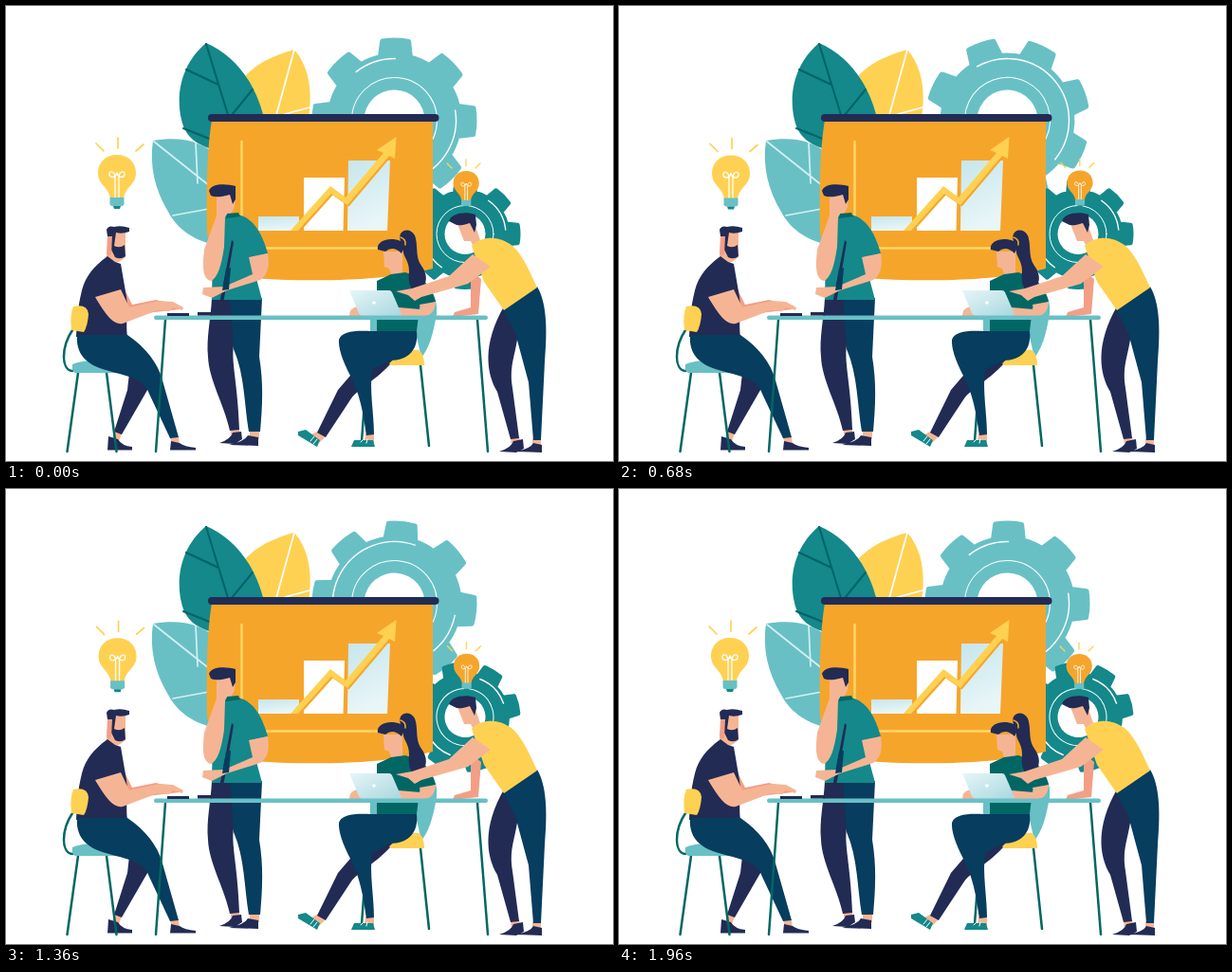
These frames come from a looping animation (640 px wide and 480 px high, 2 s). An HTML page:

```html
<!DOCTYPE html>
<html lang="en">
<head>
<meta charset="utf-8">
<title>Team meeting</title>
<style>
html, body { margin: 0; width: 100%; height: 100%; overflow: hidden; background: #fff; }
svg { display: block; width: 640px; height: 480px; }
.navy { fill: #222b54; } .blue { fill: #073d5e; } .teal { fill: #14888a; } .deep { fill: #006764; }
.aqua { fill: #68c0c5; } .sun { fill: #ffd152; } .amber { fill: #f6a52b; }
.skin { fill: #f5b595; } .blush { fill: #f29f86; }
.line { fill: none; stroke-linecap: round; stroke-linejoin: round; }
.leg { stroke: #006764; stroke-width: 2.5; }
.white { stroke: #fff; }
</style>
</head>
<body>
<svg viewBox="0 0 640 480">
<defs>
  <linearGradient id="ice" x2=".3" y2="1"><stop stop-color="#c6e6ec"/><stop offset="1" stop-color="#e9f6f8"/></linearGradient>
  <linearGradient id="lid" x2="1" y2="1"><stop stop-color="#e6f6f8"/><stop offset="1" stop-color="#a9d7df"/></linearGradient>
  <path id="arrow" d="M300 237L342 190L358 202L398 155L391 152L411.500 138L410 161L404 158L360 210L343 198L308 237Z"/>
  <!-- bulb drawn around the middle of its glass -->
  <g id="bulb">
    <path d="M0-19C12-19 20-11 20 0C20 13 9 14 7 27H-7C-9 14-20 13-20 0C-20-11-12-19 0-19Z"/>
    <path class="line white" stroke-width="1.300" d="M-2 26V4C-3-3-9-2-8 2C-7 6-1 5 0 0C1 5 7 6 8 2C9-2 3-3 2 4V26"/>
    <path class="aqua" d="M-7.500 26H7.500V33Q7 35 5 35H-5Q-7 35-7.500 33Z"/>
    <path class="teal" d="M-4 35H4L3 38H-3Z"/>
  </g>
</defs>

<!-- foliage -->
<path class="sun" d="M304 46C278 53 262 63 252 74L271 118H319C322 98 323 68 304 46Z"/>
<path class="line white" stroke-width="1.700" d="M304 46L285 115M294 114L320 107"/>
<path class="aqua" d="M155 142C185 137 205 143 220 156V252C195 246 180 234 171 217C157 194 151 168 155 142Z"/>
<path class="line" stroke="#d5f0f2" stroke-width="1.700" d="M156 143L215 190M200 144L202 187M176 221L214 214"/>
<path class="teal" d="M211 39C240 52 262 78 272 118L217 151C201 146 189 138 185 120C178 90 187 59 211 39Z"/>
<path class="line" stroke="#006468" stroke-width="2" d="M211 40L234 115M190 67L224 83M187 129L217 141M260 88L238 115"/>

<g id="big"></g>
<g id="small"></g>

<!-- presentation screen -->
<path class="amber" d="M217 120C212 150 211 190 212 240L222 284C300 292 395 292 450 277V120Z"/>
<rect class="navy" x="213" y="114" width="243.500" height="8" rx="4"/>
<path class="line" stroke="#ffd563" stroke-width="2.500" d="M248.500 143V257M274 255.500H403"/>
<path fill="url(#ice)" d="M266 222H309V237H266Z"/>
<path fill="#fff" d="M314 181H357L355.500 237H314Z"/>
<path fill="url(#ice)" d="M361 163H405L402 237H360Z"/>
<use href="#arrow" class="amber" x="1.500" y="1.500"/>
<use href="#arrow" class="sun"/>

<g id="leftBulb">
  <use href="#bulb" class="sun" x="117" y="176"/>
  <path class="line" stroke="#ffd152" stroke-width="1.700" d="M118 139V150M95 145L103 153M145 146L137 153"/>
</g>
<g id="rightBulb">
  <use href="#bulb" class="amber" transform="translate(485.200 187) scale(.68)"/>
  <path class="line" stroke="#ffd152" stroke-width="1.300" d="M485 162V169M465 166L470 171M500 166L495 171"/>
</g>

<!-- man at the left -->
<path class="skin" d="M114 448L122 451L119 459H112ZM173 455H182L183 463H175Z"/>
<path class="navy" d="M131 378L152 400L122 452L114 449L128 405Z"/>
<path class="navy" d="M108 454L118 457Q122 464 133 465V468.500H107Z"/>
<path class="line leg" d="M76 387L64.500 470M106 387L116.500 470M70 342C58 360 58 384 70 385"/>
<path class="blush" d="M122 293L133 315L158 310L185 317L183 320L130 326Z"/>
<path class="skin" d="M108 240L126 238V265L119 270L115 271L106 265Z"/>
<path class="navy" d="M107 264C92 275 84 285 80 300C75 320 75 333 74 349H128C126 335 129 320 127 307L121 272L115 270Z"/>
<path class="aqua" d="M70 378Q85 372 104 375L120 381V387H73Q69 386 70 378Z"/>
<path class="sun" d="M71 317Q86 314 87 325Q86 338 82 344L69 342Q67 326 71 317Z"/>
<path class="blue" d="M75 347H128C147 360 160 376 165 395L182 455L173 456L151 409C144 388 116 390 94 380C78 372 74 360 75 347Z"/>
<path class="navy" d="M174 459L183 461Q188 465 200 466V468.500H173Z"/>
<path class="navy" d="M106 236Q108 231 114 233Q121 231 130 234V238Q122 241 116 239L114 253Q120 256 125 252L126 264Q121 268 115 265L111 257L111 243H107Z"/>
<path class="blush" d="M107 243H112L111 262Q108 266 106 261Z"/>
<path class="skin" d="M94 307L121 299L130 318L162 311L176 312L187 318L186 321L176 318L172 322L160 321L123 335C112 337 103 322 94 307Z"/>

<!-- standing man -->
<path class="skin" d="M236 445H246V455H238ZM257 446H267V457H257Z"/>
<path class="navy" d="M217 308H241L242 350C235 370 244 390 246 447L236 448C230 420 214 395 213 370C211 350 216 330 217 308Z"/>
<path class="blue" d="M236 308H270L267 370C272 400 270 425 268 449H256C251 420 252 390 240 362Z"/>
<path class="navy" d="M225 461Q237 457 239 450L248 449L249 457L241 462ZM235 463Q252 459 255 453L266 455V464Z"/>
<path class="skin" d="M221 198H242L241 212L236 222L226 224Z"/>
<path class="teal" d="M217 310L218 250C222 235 227 225 233 220L248 221C262 226 270 240 276 261L258 265L270 310Z"/>
<path class="deep" d="M233 219L245 218L247 222L232 224Z"/>
<path class="skin" d="M222 205L230 204L235 214L231 223L230 254C227 275 223 287 216 290C207 288 207 275 209 257L222 221Z"/>
<path class="navy" d="M214 195C216 187 232 187 242 190V204L239 209L236 199Q222 203 216 200Z"/>
<path class="navy" d="M238 247L240 249L229 314L225.500 312Z"/>
<path class="skin" d="M256 265L276 261C278 275 276 284 268 289L233 300L217 308L207 304L208 297L230 296L260 283Z"/>
<path class="blue" d="M232 277L237 276L235 299L228 300Z"/>

<!-- woman with laptop -->
<path class="aqua" d="M433 300C447 296 456 306 454 325C450 348 446 361 438 371L432 345ZM384 331H394V344H384Z"/>
<path class="line leg" stroke-width="3" d="M437 379L446 464M379 405L375 459"/>
<path class="skin" d="M328 449L337 454L330 461L320 453ZM379 451H388V461H378Z"/>
<path class="navy" d="M410 372C395 392 373 402 364 414L337 455L328 450L350 405L375 376Z"/>
<path class="sun" d="M404 377Q420 361 435 363Q441 367 441 379H406Z"/>
<path class="blue" d="M351 352C354 343 368 342 385 343H433C435 361 426 374 404 374L386 384C383 405 388 430 388 452L380 453C376 425 373 410 363 390Q350 365 351 352Z"/>
<path class="teal" d="M308 449L316 447L331 458L328 465L308 453ZM364 465L367 458H387L389 465Z"/>
<path class="line white" stroke-width="1" d="M321 459L325 454M324 462L328 457M377 457L374 460M381 457L380 461"/>
<path class="skin" d="M398 259H418V284L408 289L404 277L399 275Z"/>
<path class="deep" d="M391 290L406 283L421 281L436 286C445 293 451 302 453 312L436 318L433 343H391Z"/>
<path class="navy" d="M392 257C390 248 404 243 416 248C412 237 425 232 431 242C435 253 431 264 438 274C446 285 444 296 433 301C425 300 424 289 425 280C425 267 418 265 419 257L417 261Q408 252 400 259Z"/>
<path class="line" stroke="#f6a52b" stroke-width="1.500" d="M416 244Q422 246 421 252"/>
<path class="skin" d="M436 315L453 312Q452 326 441 327H415L414 318L437 320ZM362 327Q362 319 370 317L376 327Z"/>
<path fill="url(#lid)" d="M362 300H404Q406 300 407 302L417 325L415 327H376Q373 326 372 324Z"/>
<circle cx="388" cy="313" r="1.800" fill="#fff"/>

<!-- leaning man -->
<path class="skin" d="M532 455L541 454L543 465L533 464ZM555 456H564V466H555Z"/>
<path class="blush" d="M490 279L501 288L498 325L471 328L473 323L490 318Z"/>
<path class="navy" d="M525 317L540 345C537 370 530 380 534 403L541 456L532 457L518 407C503 382 506 350 525 317Z"/>
<path class="blue" d="M524 320L560 296C570 313 571 340 568 375L564 458H556L551 397L537 345Z"/>
<path class="navy" d="M520 470Q533 466 535 459L545 457L546 467L538 471ZM538 470Q553 467 556 461L565 463V471Z"/>
<path class="skin" d="M476 230L493 226L500 247L493 254L490 248L483 248Z"/>
<path class="navy" d="M467 227C469 219 484 216 495 220L496 231L494 239L489 229Q477 233 473 230Z"/>
<path class="sun" d="M491 253C502 242 520 242 534 253C545 263 552 280 560 297L525 321L504 291Z"/>
<path class="skin" d="M492 262L511 275L487 293L438 307L431 311L424 305L411 301L428 298L467 285Z"/>

<!-- table -->
<path class="line leg" d="M168 331L158 470M497 331L508 470"/>
<rect class="aqua" x="156" y="326.500" width="352" height="4.500" rx="2.200"/>
<path class="navy" d="M170 324H193V327H170ZM202 323H217V326.500H202Z"/>
</svg>
<script>
const $ = id => document.getElementById(id);

const at = (r, deg) => {
  const a = deg * Math.PI / 180;
  return (r * Math.sin(a)).toFixed(2) + ',' + (-r * Math.cos(a)).toFixed(2);
};
const arc = (r, from, to) => `M${at(r, from)}A${r},${r} 0 ${+(to - from > 180)} 1 ${at(r, to)}`;

function drawGear(id, color, body, tip, hole, ring, arcs) {
  let d = '';
  for (let a = 0; a < 360; a += 45) {
    d += `${d ? 'A' + body + ',' + body + ' 0 0 1 ' : 'M'}${at(body, a - 13.5)}`
      + `L${at(tip, a - 9.5)}A${tip},${tip} 0 0 1 ${at(tip, a + 9.5)}L${at(body, a + 13.5)}`;
  }
  d += `A${body},${body} 0 0 1 ${at(body, -13.5)}Z`;
  $(id).innerHTML = `<path d="${d}" fill="${color}" stroke="${color}" stroke-width="5" stroke-linejoin="round"/>
    <circle r="${hole}" fill="#fff"/>
    <circle r="${ring}" class="line white"/>
    <path d="${arcs}" class="line white" stroke-width="1.4"/>`;
}
drawGear('big', '#68c0c5', 68.5, 84.5, 32, 45, arc(65, -39, 0) + arc(65, 80, 239));
drawGear('small', '#14888a', 44.5, 56, 21.5, 30, arc(43, 35, 84) + arc(43, 215, 300));

const place = (id, x, y, turn = 0) =>
  $(id).setAttribute('transform', `translate(${x} ${y}) rotate(${turn})`);
const clamp = v => Math.max(0, Math.min(1, v));

function draw(now) {
  const step = Math.floor(now % 2000 / 40), t = step * 40;
  // two full turns, ending in the starting pose
  place('big', 409.5, 120.5, step * 720 / 49 + 0.8);
  place('small', 484, 240.5, -13.5 * clamp((t - 1120) / 240));
  const sway = Math.min(clamp(t / 300), clamp((1640 - t) / 480));
  place('leftBulb', sway, sway * .5);
  place('rightBulb', sway * .8, -sway * .5);
  requestAnimationFrame(draw);
}
draw(0);
</script>
</body>
</html>
```
